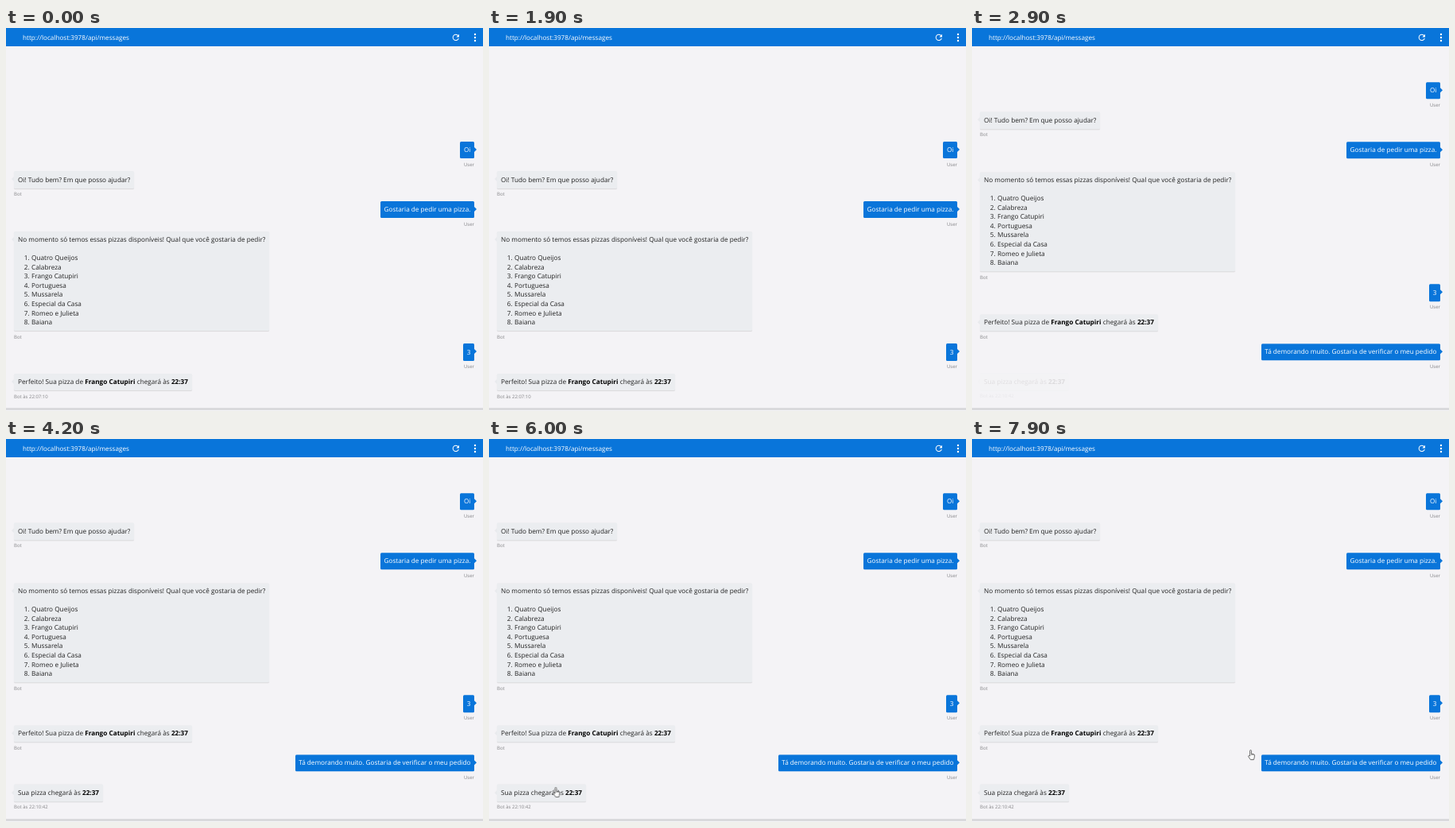
An HTML page that plays this animation: 600 px wide and 482 px high, repeating every 8 s.

```html
<!DOCTYPE html>
<html lang="pt">
<head>
<meta charset="utf-8">
<title>Chat</title>
<style>
  html, body { margin: 0; width: 100%; height: 100%; overflow: hidden; }
  body {
    position: relative; background: #f4f3f6; color: #222;
    font: 8.23px/11.57px "Open Sans", "Noto Sans", sans-serif;
    text-rendering: geometricPrecision; white-space: nowrap;
  }
  header {
    position: absolute; inset: 0 0 auto; height: 23px; z-index: 2;
    background: #0975da; color: #fff;
  }
  header span { position: absolute; left: 21px; top: 6.8px; font-size: 8.17px; }
  header svg { position: absolute; left: 0; top: 0; }
  footer {
    position: absolute; inset: 478px 0 auto; height: 3px; z-index: 2;
    background: #d9d9dc; box-shadow: 0 1px #f6f6f8;
  }

  #chat { position: absolute; inset: 0; animation: scroll 8s step-end infinite; }
  .msg { position: absolute; left: 10px; top: var(--y); }
  .user { left: auto; right: 11px; text-align: right; }
  .bubble {
    position: relative; display: inline-block; padding: 5.6px 5px 4.4px; vertical-align: top;
    background: #ebedf0; border-radius: 1.5px; box-shadow: 0 1px 1px rgba(0, 0, 0, .11);
  }
  .user .bubble {
    padding-inline: 4.6px; background: #0975da; color: #fff;
    font-size: 8.18px; box-shadow: none;
  }
  .bubble::before {
    content: ""; position: absolute; left: -3px; top: 7.3px;
    border: solid transparent; border-width: 3.5px 3px 3.5px 0; border-right-color: #e8eaed;
  }
  .user .bubble::before {
    left: auto; right: -3px; border-width: 3.5px 0 3.5px 3px; border-left-color: #0975da;
  }
  b { color: #000; }
  ol { list-style: none; margin: 11.57px 0 0; padding: 0 0 0 17px; counter-reset: n; }
  li { position: relative; counter-increment: n; }
  li::before { content: counter(n) "."; position: absolute; right: calc(100% + 2.3px); }
  .label { margin-top: 3.5px; font-size: 6px; line-height: 8px; color: #858588; }

  .ask { animation: ask 8s step-end infinite; }
  .reply { animation: reply 8s step-end infinite; }
  .time1 { animation: time1 8s step-end infinite; }
  .time2 { animation: time2 8s step-end infinite; }

  #hand {
    position: absolute; left: 0; top: 0; z-index: 3;
    animation: hand 8s linear infinite;
  }

  @keyframes scroll {
    0% { transform: none; }
    28.75% { transform: translateY(-37.4px); }
    36.25%, 100% { transform: translateY(-74.8px); }
  }
  @keyframes ask {
    0% { opacity: 0; }
    28.75% { opacity: .1; }
    30% { opacity: .55; }
    31.25% { opacity: .85; }
    32.5%, 100% { opacity: 1; }
  }
  @keyframes reply {
    0% { opacity: 0; }
    36.25% { opacity: .1; }
    37.5% { opacity: .55; }
    38.75% { opacity: .85; }
    40%, 100% { opacity: 1; }
  }
  @keyframes time1 {
    0% { font-size: 6px; }
    28.75%, 100% { font-size: 0; }
  }
  @keyframes time2 {
    0% { font-size: 6px; }
    36.25%, 100% { font-size: 0; }
  }
  @keyframes hand {
    0%, 71.25% { transform: translate(62px, 490px); }
    72.5% { transform: translate(65px, 474px); }
    75%, 78% { transform: translate(80.5px, 438px); }
    84% { transform: translate(108px, 437px); animation-timing-function: ease-in-out; }
    93.75% { transform: translate(341px, 393px); }
    97.5%, 100% { transform: translate(347px, 391px); }
  }
</style>
</head>
<body>
<header>
  <span>http://localhost:3978/api/messages</span>
  <svg width="600" height="23" fill="#fff">
    <path transform="translate(559.6 5.7) scale(.52)" d="M17.65 6.35A8 8 0 1 0 19.73 14h-2.08A6 6 0 1 1 12 6c1.66 0 3.14.69 4.22 1.78L13 11h7V4z"/>
    <circle cx="590" cy="8" r="1.2"/>
    <circle cx="590" cy="12" r="1.2"/>
    <circle cx="590" cy="16" r="1.2"/>
  </svg>
</header>

<main id="chat">
  <div class="msg user" style="--y:142.7px">
    <div class="bubble">Oi</div>
    <div class="label">User</div>
  </div>
  <div class="msg" style="--y:180.2px">
    <div class="bubble">Oi! Tudo bem? Em que posso ajudar?</div>
    <div class="label">Bot</div>
  </div>
  <div class="msg user" style="--y:217.7px">
    <div class="bubble">Gostaria de pedir uma pizza.</div>
    <div class="label">User</div>
  </div>
  <div class="msg" style="--y:255.5px">
    <div class="bubble">No momento só temos essas pizzas disponíveis! Qual que você gostaria de pedir?
      <ol>
        <li>Quatro Queijos</li>
        <li>Calabreza</li>
        <li>Frango Catupiri</li>
        <li>Portuguesa</li>
        <li>Mussarela</li>
        <li>Especial da Casa</li>
        <li>Romeo e Julieta</li>
        <li>Baiana</li>
      </ol>
    </div>
    <div class="label">Bot</div>
  </div>
  <div class="msg user" style="--y:397px">
    <div class="bubble">3</div>
    <div class="label">User</div>
  </div>
  <div class="msg" style="--y:434.5px">
    <div class="bubble">Perfeito! Sua pizza de <b>Frango Catupiri</b> chegará às <b>22:37</b></div>
    <div class="label">Bot<span class="time1"> às 22:07:10</span></div>
  </div>
  <div class="msg user ask" style="--y:471.9px">
    <div class="bubble">Tá demorando muito. Gostaria de verificar o meu pedido</div>
    <div class="label">User<span class="time2"> às 22:10:41</span></div>
  </div>
  <div class="msg reply" style="--y:509.4px">
    <div class="bubble">Sua pizza chegará às <b>22:37</b></div>
    <div class="label">Bot às 22:10:42</div>
  </div>
</main>

<footer></footer>

<svg id="hand" width="10" height="14" fill="#fff" stroke="#444" stroke-width=".8" stroke-linejoin="round">
  <path d="M2.6 8V1.4a.9.9 0 0 1 1.8 0V5.2l3 .6c.8.2 1.2.7 1.1 1.5l-.5 3.3-.7 2H3.4L.7 8.7c-.5-.8.4-1.5 1.1-.9z"/>
  <path d="M4.4 5.2v2M5.8 5.5v1.7M7.2 5.8v1.5" fill="none" stroke-width=".5"/>
</svg>
</body>
</html>
```
